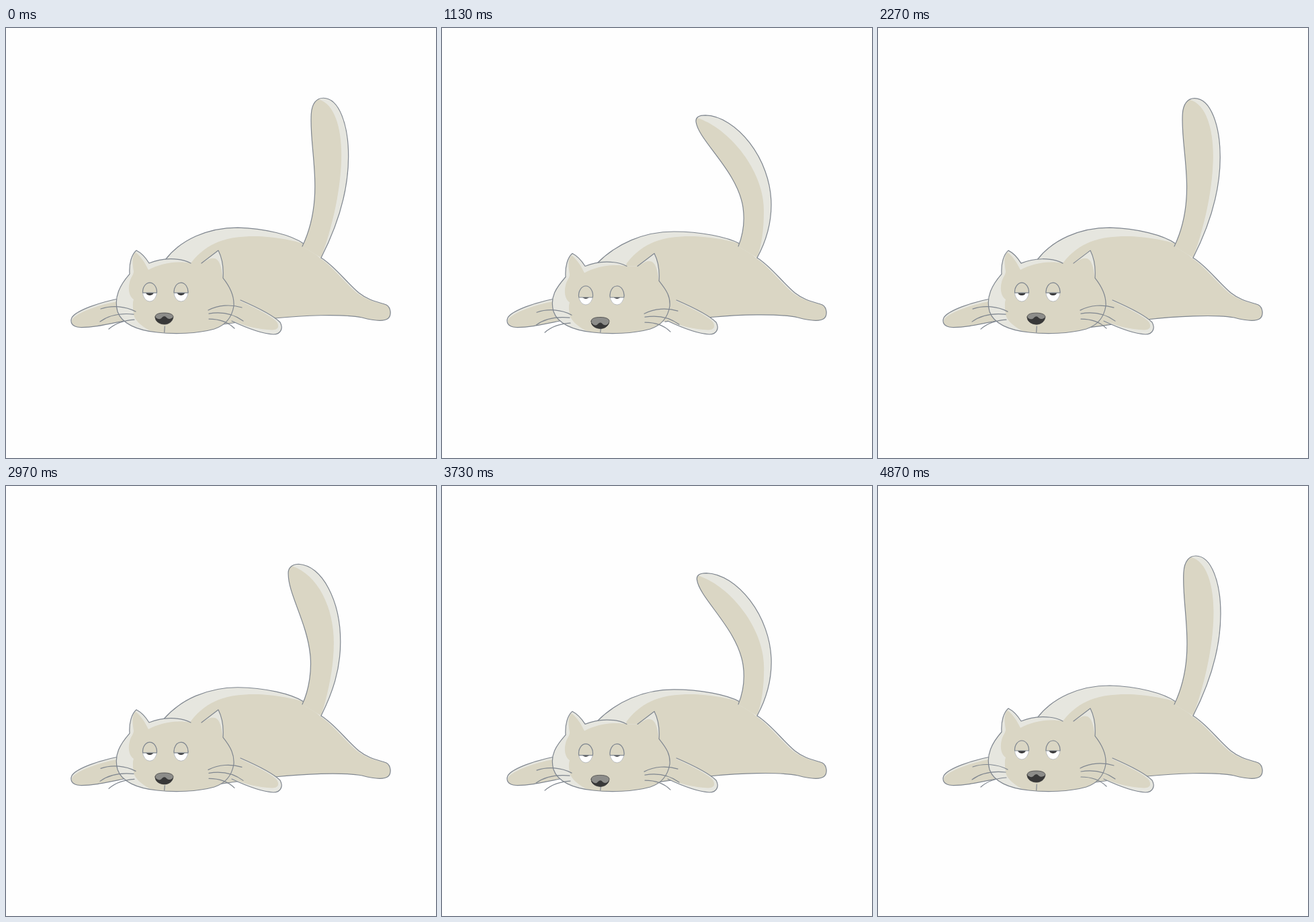
Animation, 640 px wide and 640 px high, one loop 4.93 s. Source, as an HTML page:

```html
<!DOCTYPE html>
<html lang="en">
<head>
<meta charset="utf-8">
<title>Lazy cat</title>
<style>
  html, body { margin: 0; width: 100%; height: 100%; overflow: hidden; background: #fefefe; }
  svg { display: block; width: 100%; height: 100%; }
  path, ellipse { fill: none; stroke-linecap: round; stroke-linejoin: round; }
  .line { stroke: #7f868f; stroke-width: 1.2; }
  .fur { fill: #dad6c4; }
  .light { fill: #e6e6df; }
</style>
</head>
<body>
<svg viewBox="0 0 640 640">
  <defs>
    <clipPath id="tailClip"><path id="tailClipPath"/></clipPath>
    <clipPath id="headClip"><path id="headClipPath"/></clipPath>
  </defs>

  <path class="light" d="M172 402C140 408 105 420 98 431C95 438 98 445 110 445.500C130 446 150 441 180 435Z"/>
  <path class="fur" d="M172 406C140 411 110 422 100 432C95 438 98 445 110 445.500C130 446 150 441 180 435Z"/>
  <path class="line" d="M172 402C140 408 105 420 98 431C95 438 98 445 110 445.500C130 446 150 441 180 435"/>

  <path id="body" class="light"/>
  <path id="bodyFur" class="fur"/>
  <path id="back" class="line"/>
  <path id="belly" class="line"/>

  <path id="tail" class="light"/>
  <path id="tailFur" class="fur" clip-path="url(#tailClip)"/>
  <path id="tailLine" class="line"/>

  <path class="light" d="M349 405C372 415 397 427 408 438C413 447 409 456 398 456C380 455 355 445 336 436Z"/>
  <path class="fur" d="M346 405C372 417 400 431 404 439C407 446 404 449 396 449.500C378 449 355 444 336 435Z"/>
  <path class="line" d="M349 405C372 415 397 427 408 438C413 447 409 456 398 456C380 455 355 445 336 436"/>

  <path id="head" class="light"/>
  <path id="headFur" class="fur" clip-path="url(#headClip)"/>
  <path id="headLine" class="line"/>

  <g id="eyes"></g>

  <path id="chin" class="line"/>
  <g id="nose">
    <path fill="none" style="fill:#8d8d8a" stroke="#444" stroke-width=".8"
      d="M222 430C222 425 229 424 236 424C243 424 249 426 249 430C248 437 242 441 236 441C229 441 222 437 222 430Z"/>
    <path id="noseDark" style="fill:#383838"/>
  </g>
  <g id="whiskers" class="line">
    <path d="M141 418C158 412 178 414 193 422M140 437C152 428 170 424 190 426M153 448C162 440 175 435 191 434"/>
    <path d="M301 420C316 412 335 411 351 416M302 425C320 422 338 425 353 436M302 433C318 433 330 437 340 447"/>
  </g>
</svg>
<script>
const LOOP = 4930, SWAY = LOOP / 2, LEAD = 75;
const $ = id => document.getElementById(id);
const draw = (id, d) => $(id).setAttribute('d', d);
const move = (id, x, y) => $(id).setAttribute('transform', `translate(${x} ${y})`);

// Coordinates marked with ^ follow the vertical shift.
const shift = (d, dy) => d.replace(/([\d.]+)\^/g, (_, y) => +y + dy);

// Tail poses: upright, leaning, fully bent; control points along each edge.
const tailPoses = [
  [453,300,460,268,460,235, 460,193,453,160,455,128, 456,112,463,104,473,104, 497,104,510,145,510,190, 510,240,494,293,469,342],
  [451,303,454,276,451,255, 445,206,410,162,409,133, 408,125,414,120,424,120, 462,122,495,178,495,242, 495,282,484,312,469,342],
  [449,305,451,288,448,267, 440,213,382,168,378,140, 377,133,382,130,392,130, 437,131,490,194,490,263, 490,295,481,320,469,342]
];
const shadePoses = [
  [466,106, 490,112,500,150,499.5,190, 499,235,488,290,469,342],
  [413,123, 455,137,485,190,485,245, 485,280,478,312,469,342],
  [380,134, 425,148,479,210,479,272, 479,300,476,322,469,342]
];
// Quadratic blend through the poses at 0, 0.6 and 1.
const blend = (poses, k) => {
  const a = (k - .6) * (k - 1) / .6, b = k * (1 - k) / .24, c = k * (k - .6) / .4;
  return poses[0].map((v, i) => (v * a + poses[1][i] * b + poses[2][i] * c).toFixed(2));
};

const bellyKeys = [[0, 0], [630, -2.5], [1130, -3], [1630, -1], [2270, 4], [2970, 2], [3730, -.5], [LOOP, 0]];
const bellyAt = t => {
  const i = bellyKeys.findIndex(key => key[0] > t);
  const [t0, v0] = bellyKeys[i - 1], [t1, v1] = bellyKeys[i];
  return v0 + (v1 - v0) * (1 - Math.cos(Math.PI * (t - t0) / (t1 - t0))) / 2;
};

const EARS = '184 366^C183 350^ 187 337^ 194 331^C202 335^ 208 342^ 213 350^C232 342^ 258 341^ 275 350^';
const RIGHT_EAR = '291 350^L316 331^C322 343^ 324 358^ 323 372^';
const JAW = 'C335 387^ 340 400 339 414C336 432 325 443 310 448C285 455 250 456 225 453C195 450 172 440 166 422C160 400 170 382^ 184 366^';
const FACE = 'M190 362^C188 350^ 187 338^ 193 334^C203 342^ 208 352^ 212 360^C230 350^ 255 346^ 275 350^' +
  'L291 350^L302 344^C317 338^ 320 352^ 323 372^L345 390L345 460L222 454C205 447 190 435 190 425' +
  'C188 412^ 189 407^ 190 404^C184 400^ 181 390^ 184 378^C186 370^ 190 368^ 190 362^Z';
const HIND = 'C490 355 505 377 525 394C540 406 555 408 566 412C573 416 574 427 569 432C562 438 545 435 530 431';

$('eyes').innerHTML = [214, 260.5].map((x, i) => `<g id="eye${i}" data-x="${x}">
  <ellipse rx="10.5" ry="14" style="fill:#fff" stroke="#a5aab0" stroke-width=".7"/>
  <ellipse rx="6" ry="5" style="fill:#3a3a3c"/>
  <path id="lid${i}" class="fur line"/></g>`).join('');

function drawBody(k, b) {
  const top = `M${237 - 6 * k} ${345 + 5 * k}` + shift('C260 315^ 300 297^ 345 297^', 6 * k) +
    `C385 ${298 + 5 * k} 425 ${308 + 3 * k} 443 321`;
  const under = `C500 ${425 + b * .2} 440 ${428 + b * .4} 400 ${432 + b * .5}` +
    `C370 ${435 + b * .7} 350 ${437 + b} ${323 - b * 3} ${441 + b * 1.3}`;
  draw('body', `${top}L469 342${HIND}${under}L240 440Z`);
  draw('bodyFur', `M275 350C300 318 330 310 370 310C400 310 430 317 443 321L468 343` +
    `C488 357 503 378 523 395C540 407 555 409 566 412C573 416 574 427 569 432C562 438 545 435 530 431${under}L240 440Z`);
  draw('back', top);
  draw('belly', `M469 342${HIND}${under}`);
}

function drawTail(k) {
  const p = blend(tailPoses, k), s = blend(shadePoses, k);
  let outline = 'M441 325';
  for (let i = 0; i < p.length; i += 6) outline += 'C' + p.slice(i, i + 6).join(' ');
  for (const id of ['tail', 'tailLine', 'tailClipPath']) draw(id, outline);
  draw('tailFur', `M${s[0]} ${s[1]}C${s.slice(2).join(' ')}L430 345L340 130Z`);
}

function drawHead(k) {
  const h = 4.5 * k;
  const shape = shift(`M${EARS}L${RIGHT_EAR}${JAW}Z`, h);
  draw('head', shape);
  draw('headClipPath', shape);
  draw('headFur', shift(FACE, h));
  draw('headLine', shift(`M${EARS}M${RIGHT_EAR}${JAW}`, h));

  const lid = 1 + 2 * k, half = 10.5 * Math.sqrt(1 - (lid / 14) ** 2);
  for (const i of [0, 1]) {
    move('eye' + i, $('eye' + i).dataset.x, 393 + 5 * k);
    draw('lid' + i, `M${-half} ${lid}A10.5 14 0 1 1 ${half} ${lid}Z`);
  }

  const w = 3 * k;
  move('nose', 0, 6.5 * k);
  draw('noseDark', `M222 ${430 + w / 2}C226 ${434 + w} 230 ${434 + w} 232 ${431 + w}Q236 ${427 + w} 239 ${431 + w}` +
    `C242 ${434 + w} 246 ${433 + w} 249 ${430 + w / 2}C248 437 242 441 236 441C229 441 222 437 222 ${430 + w / 2}Z`);
  draw('chin', `M236.300 ${444 + 4 * k}L235.700 453`);
  move('whiskers', 0, 5.2 * k);
}

function frame(now) {
  const t = now % LOOP;
  const k = Math.sin(Math.PI * (t + LEAD) / SWAY) ** 2;
  drawBody(k, bellyAt(t));
  drawTail(k);
  drawHead(k);
  requestAnimationFrame(frame);
}
frame(0);
</script>
</body>
</html>
```
